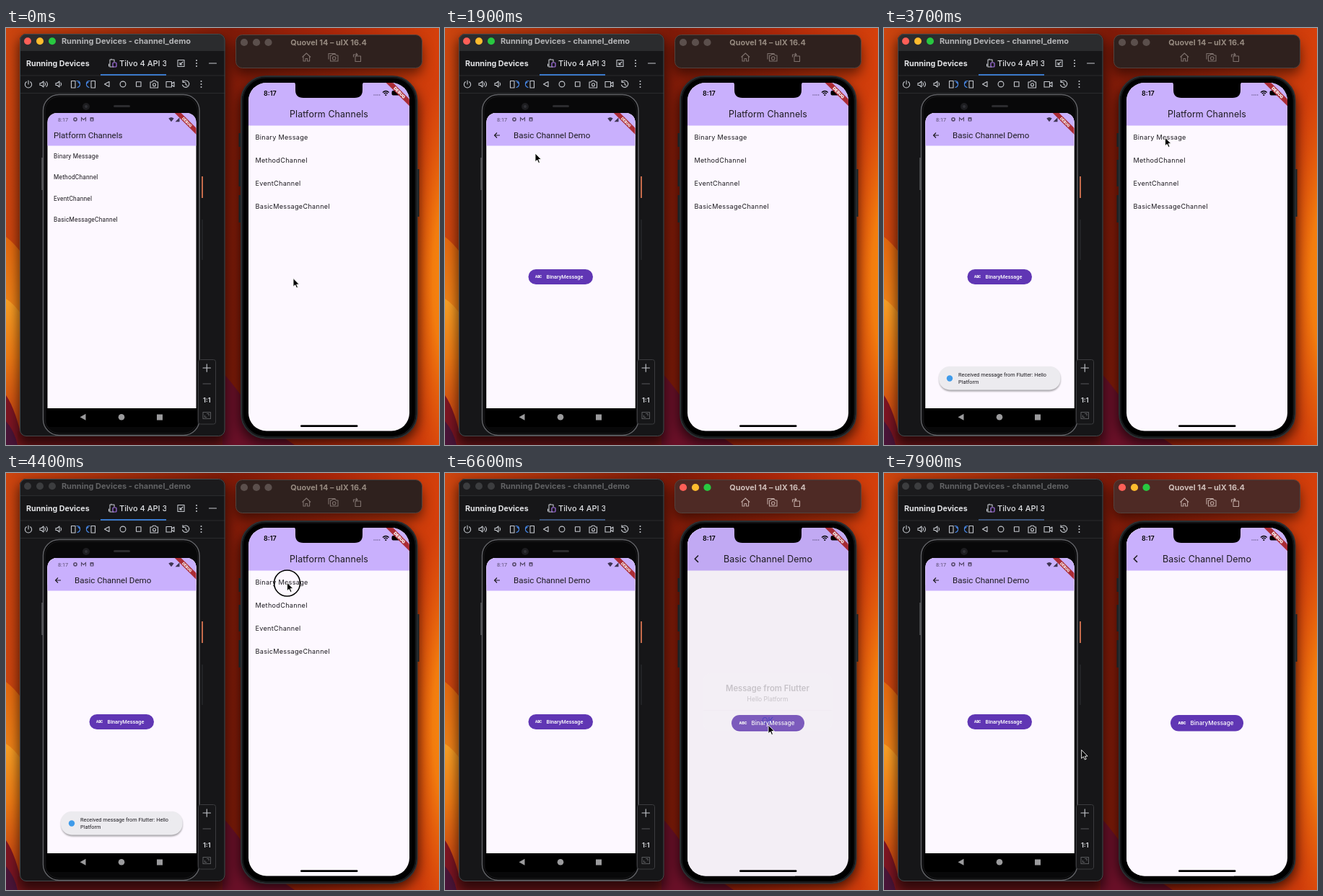
Recreate the animation shown at these times as an HTML page. Size 600 by 579 pixels, loop 8 s.

```html
<!DOCTYPE html>
<html lang="en">
<head>
<meta charset="utf-8">
<title>Platform Channels</title>
<style>
  html, body { margin: 0; width: 100%; height: 100%; overflow: hidden; background: #6e1607; }
  svg { display: block; width: 600px; height: 579px; font-family: Inter, sans-serif; }
  .android { font-family: Roboto, sans-serif; }
  .line { fill: none; stroke: #c5c8ce; stroke-width: 1.1; stroke-linecap: round; stroke-linejoin: round; }
  .blue { stroke: #4a8df0; }
  .mid { text-anchor: middle; }
  .bold { font-weight: 700; }
  .ink { fill: #1d1b20; }
  .white { fill: #fff; }
</style>
</head>
<body>
<svg viewBox="0 0 600 579" xmlns="http://www.w3.org/2000/svg">
  <defs>
    <linearGradient id="wall">
      <stop offset="0" stop-color="#cc450f"/><stop offset=".2" stop-color="#ad330c"/>
      <stop offset=".52" stop-color="#7e1a08"/><stop offset=".75" stop-color="#a8260a"/>
      <stop offset="1" stop-color="#d5400b"/>
    </linearGradient>
    <radialGradient id="glow" gradientUnits="userSpaceOnUse" cx="0" cy="0" r="1" gradientTransform="translate(625 350) scale(75 300)">
      <stop offset="0" stop-color="#ff9612"/><stop offset=".45" stop-color="#f27c0e"/>
      <stop offset="1" stop-color="#e2570c" stop-opacity="0"/>
    </radialGradient>
    <linearGradient id="swoosh" x2="0" y2="1">
      <stop offset="0" stop-color="#e4680f"/><stop offset=".35" stop-color="#ee8318"/>
      <stop offset="1" stop-color="#c23a0e"/>
    </linearGradient>
    <linearGradient id="band" x2="0" y2="1">
      <stop offset="0" stop-color="#f9a126"/><stop offset=".4" stop-color="#ee7a14"/>
      <stop offset="1" stop-color="#b8300f"/>
    </linearGradient>
    <filter id="soft" x="-20%" y="-30%" width="140%" height="160%"><feGaussianBlur stdDeviation="8"/></filter>
    <filter id="faint" x="-10%" y="-30%" width="120%" height="160%"><feGaussianBlur stdDeviation="1.2"/></filter>
    <clipPath id="aClip"><path d="M57.500 528V131a13 13 0 0 1 13-13h180a13 13 0 0 1 13 13v397z"/></clipPath>
    <clipPath id="iClip"><rect x="336" y="76" width="223" height="483.500" rx="25"/></clipPath>
    <clipPath id="tabClip"><rect x="130" y="32" width="92" height="34"/></clipPath>
  </defs>

  <!-- wallpaper -->
  <rect width="600" height="579" fill="url(#wall)"/>
  <rect x="540" width="60" height="579" fill="url(#glow)"/>
  <path d="M0 290Q12 299 24 316V579H0z" fill="url(#swoosh)"/>
  <path d="M0 376Q12 383 24 402V579H0z" fill="url(#band)"/>
  <path d="M0 510Q14 530 24 579H0z" fill="#7c1522"/>
  <path d="M0 546Q12 560 16 579H0z" fill="#4a1538"/>
  <path d="M16 560H330V579H16z" fill="#74161a"/>
  <path d="M300 478Q320 500 350 545L400 579H300z" fill="#6a1028"/>
  <g filter="url(#soft)">
    <rect x="17" y="14" width="288.500" height="566" rx="12" opacity=".6"/>
    <rect x="318" y="20" width="259" height="44" rx="12" opacity=".5"/>
    <rect x="324" y="76" width="247.500" height="500" rx="34" opacity=".65"/>
  </g>

  <!-- left window -->
  <rect x="19" y="8" width="284.500" height="559" rx="9" fill="#161618"/>
  <path id="aBar" d="M19 31V17a9 9 0 0 1 9-9h266.500a9 9 0 0 1 9 9v14z"/>
  <path d="M19 31.500h284.500M19 66h284.500M19 90.500h284.500" stroke="#2a2b2d"/>
  <rect x="19.500" y="8.500" width="283.500" height="558" rx="8.500" fill="none" stroke="#47484a"/>
  <g id="aLights"></g>
  <text id="aTitle" class="mid bold" x="166.500" y="22" font-size="11">Running Devices - channel_demo</text>
  <text class="bold" x="28" y="52.500" font-size="10.700" fill="#e4e5e8">Running Devices</text>
  <g clip-path="url(#tabClip)">
    <path class="line" d="M149 54h-5v-10h6v3M146 44v-1M142.500 50v3"/>
    <rect x="148" y="48" width="5" height="6" rx="1" fill="none" stroke="#a571e6" stroke-width="1.200"/>
    <text x="157" y="52.500" font-size="11" font-weight="500" fill="#dfe1e5">Tilvo 4 API 3</text>
  </g>
  <rect id="underline" x="131" y="64" width="91" height="2"/>
  <g id="tabTools">
    <path class="line" d="M238 44.500h9v9h-9zM245 47l-4 4M241 48v3h3M281.500 49h10"/>
    <g id="tabDots" fill="#c5c8ce"></g>
  </g>
  <g id="barDots" fill="#c5c8ce"></g>
  <!-- device toolbar -->
  <path class="line" d="M31 73v5M28.300 74.700a4.600 4.600 0 1 0 5.400 0"/>
  <path class="line" d="M47 76.500h2l3-2.500v8l-3-2.500h-2zM54 76q1.500 2 0 4M56 74.500q3 3.500 0 7M69 76.500h2l3-2.500v8l-3-2.500h-2zM76 76q1.500 2 0 4"/>
  <path class="line" d="M90.500 73.500h5.500v9.500h-5.500zM118 73.500h5.500v9.500h-5.500z"/>
  <path class="line blue" d="M99 82.500q4-1 3.500-6M98 73.500q4 0 4.500 3M100 75.500l2.500 1.500M115 82.500q-4-1-3.500-6M116 73.500q-4 0-4.500 3M114 75.500l-2.500 1.500"/>
  <path class="line" d="M143 74.500v7l-6.500-3.500zM180.500 74.800h6.500v6.500h-6.500zM200 75h2.500l1.200-1.800h3.600l1.200 1.800h2v8h-10.500zM222 74.500h7.500v7.500h-7.500zM230 77l3-2v6.500l-3-2M245.500 74.500a4.700 4.700 0 1 1-1 4.500M245 72.500v3h3M249 76v2.500l2 1"/>
  <circle class="line" cx="162" cy="78" r="3.900"/><circle class="line" cx="205.500" cy="78.800" r="2"/>

  <!-- left phone -->
  <rect x="51.500" y="92.500" width="216.500" height="473" rx="22" fill="#060607" stroke="#5f6064" stroke-width="1.500"/>
  <rect x="54" y="95" width="211.500" height="468" rx="20" fill="#080809" stroke="#202022" stroke-width=".8"/>
  <path d="M50 180v45" stroke="#77787c"/>
  <path d="M272 206v30" stroke="#c56b4b" stroke-width="2"/><path d="M272 266v56" stroke="#27282b" stroke-width="1.500"/>
  <circle cx="111" cy="109" r="5" fill="#1d1d20"/><circle cx="111" cy="109" r="2" fill="#303136"/>
  <rect x="149" y="107" width="23" height="3" rx="1.500" fill="#2b2b2e"/>
  <path d="M56 528h209v20q0 6-6 6H62q-6 0-6-6z" fill="#000"/>
  <g fill="#9b9b9d"><path d="M110.500 535.800v9l-8-4.500z"/><circle cx="160" cy="540.300" r="4.300"/><rect x="209" y="536.500" width="8" height="8"/></g>
  <g class="android" clip-path="url(#aClip)">
    <g id="aHome">
      <path d="M57 118h207v410H57z" fill="#fdf8ff"/><path d="M57 118h207v45.500H57z" fill="#c9b0fd"/>
      <rect id="aTile" x="57" y="163.500" width="207" height="29.500"/>
      <text class="ink" x="66" y="152.500" font-size="11.550">Platform Channels</text>
      <g id="aList" class="ink" font-size="8.400" letter-spacing=".2"></g>
    </g>
    <g id="aDemo">
      <path d="M57 118h207v410H57z" fill="#fdf8ff"/><path d="M57 118h207v45.500H57z" fill="#c9b0fd"/>
      <path d="M76 149h-7.500M72 145.500l-3.500 3.500 3.500 3.500" fill="none" stroke="#1d1b20" stroke-width="1.100"/>
      <text class="ink" x="95" y="152.500" font-size="11.550">Basic Channel Demo</text>
      <rect x="115.500" y="335" width="89.500" height="21" rx="10.500" fill="#6036b4"/>
      <rect id="aPress" x="115.500" y="335" width="89.500" height="21" rx="10.500" class="white"/>
      <text class="white" x="125" y="347.300" font-size="4.600" font-weight="900">ABC</text>
      <text class="white" x="140.500" y="348.300" font-size="7.350" font-weight="500">BinaryMessage</text>
    </g>
    <text x="72" y="129.500" font-size="7.400" fill="#584c6e">8:17</text>
    <g fill="none" stroke="#55496b" stroke-width="1.500">
      <circle cx="96" cy="126.800" r="2.100"/><path d="M104.500 129.500v-5l3 3 3-3v5" stroke-width="1.100"/>
    </g>
    <rect x="116.500" y="124" width="5" height="5.500" rx=".8" fill="#55496b"/>
    <path d="M119 125l-1.500 3.500h3z" fill="#c9b0fd"/>
    <path d="M229 130.200l-3.700-4.700q3.700-3 7.400 0zM234.500 130.200h6v-6z" fill="#3f3553"/>
    <g id="aBanner" transform="translate(263.500 118) rotate(45) scale(.525)"></g>
    <g id="toast">
      <g id="toastBox">
        <rect x="76.500" y="471.500" width="168" height="33" rx="15" fill="#000" opacity=".35" filter="url(#faint)"/>
        <rect x="76" y="470" width="168.500" height="32.500" rx="15" fill="#ecebef"/>
      </g>
      <g id="toastText">
        <circle cx="91" cy="486.500" r="4.200" fill="#3f9bea"/>
        <text class="ink" font-size="7.350"><tspan x="103" y="483.600">Received message from Flutter: Hello</tspan><tspan x="103" y="494">Platform</tspan></text>
      </g>
    </g>
  </g>
  <rect x="266.500" y="460.500" width="24" height="89.500" rx="3" fill="#161618" stroke="#3b3c3f"/>
  <path class="line" d="M273 472h10.500M278.250 466.800v10.500"/>
  <path class="line" d="M273 494h10.500M273 533.500h10.500v9h-10.500zM275.500 538v2.500h2.500M281 538v-2.500h-2.500" style="stroke:#58595c"/>
  <text class="mid bold" x="278.300" y="519.500" font-size="9" fill="#cfd1d5">1:1</text>

  <!-- right title bar -->
  <rect id="iBar" x="318.500" y="9.500" width="258" height="46" rx="9" stroke="#54423d"/>
  <g id="iLights"></g>
  <text id="iTitle" class="mid bold" x="447" y="23.700" font-size="10.900">Quovel 14 – ulX 16.4</text>
  <path id="iIcons" fill="none" stroke-width="1.100" stroke-linejoin="round" d="M410.500 40.500l5.800-5.500 5.800 5.500M412 39.500v6.500h3v-3.500h2.600v3.500h3v-6.500M449.500 38h2l1-1.500h4l1 1.500h2.500v8h-10.500zM447 43.500v-8h9.500M452.500 42a2.200 2.200 0 1 1 4.400 0 2.200 2.200 0 1 1-4.400 0M484 39h7.500v7.500h-7.500zM481.500 40.500v-3.500h5M485 35l2 2-2 2"/>

  <!-- right phone -->
  <path d="M324 146v19M324 183v37M324 232v38M571 196v66" stroke="#1b2326" stroke-width="3"/>
  <rect x="326" y="67" width="243.500" height="502.500" rx="34" fill="#000" stroke="#2a2f32" stroke-width="2"/>
  <rect x="328" y="69" width="239.500" height="498.500" rx="32" fill="none" stroke="#17191b" stroke-width="1.500"/>
  <g clip-path="url(#iClip)">
    <g id="iHome">
      <path d="M336 76h223v484H336z" fill="#fdf8ff"/><path d="M336 76h223v59.500H336z" fill="#c9b0fd"/>
      <rect id="iTile" x="336" y="135.500" width="223" height="32"/>
      <text class="ink mid" x="447.500" y="123.700" font-size="12.400" letter-spacing=".1">Platform Channels</text>
      <g id="iList" class="ink" font-size="9.100" letter-spacing=".3"></g>
    </g>
    <g id="iDemo">
      <path d="M331 76h5v484h-5z" fill="#000" opacity=".08"/>
      <path d="M336 76h223v484H336z" fill="#fdf8ff"/><path d="M336 76h223v59.500H336z" fill="#c9b0fd"/>
      <path d="M351 114.500l-4.700 4.700 4.700 4.700" fill="none" stroke="#1d1b20" stroke-width="1.500"/>
      <text class="ink mid" x="447.500" y="123.700" font-size="12.400" letter-spacing=".1">Basic Channel Demo</text>
      <rect x="397" y="336" width="101" height="22.500" rx="11.250" fill="#6036b4"/>
      <text class="white" x="407.500" y="349.200" font-size="5" font-weight="900">ABC</text>
      <text class="white" x="424.500" y="350.200" font-size="8" font-weight="500" letter-spacing=".05">BinaryMessage</text>
    </g>
    <text x="357" y="94" font-size="9" font-weight="600">8:17</text>
    <path d="M509.500 93h9" stroke="#75669a" stroke-width="1.300" stroke-dasharray="1.300 1.200"/>
    <path d="M522 89.500q4.300-4 8.600 0M523.700 91.300q2.600-2.400 5.200 0" fill="none" stroke="#000" stroke-width="1.300"/><circle cx="526.300" cy="93" r="1.100"/>
    <rect x="534.500" y="87" width="12" height="6.600" rx="2"/>
    <g id="iBanner" transform="translate(559 76) rotate(45) scale(.572)"></g>
    <rect x="408" y="551.300" width="79.500" height="2.800" rx="1.400"/>
    <rect id="dim" x="336" y="76" width="223" height="484"/>
    <g id="alert">
      <rect x="370" y="284" width="154" height="68" rx="8" fill="#f7f5f8"/>
      <path d="M370 328h154" stroke="#d8d6da" stroke-width=".5"/>
      <text class="mid" x="447" y="305.500" font-size="9.700" font-weight="600" fill="#222">Message from Flutter</text>
      <text class="mid" x="447" y="317.500" font-size="7.400" fill="#222">Hello Platform</text>
      <text class="mid" x="447" y="343.500" font-size="9.700" fill="#0a7aff">OK</text>
    </g>
  </g>
  <path d="M397 75q4 0 4 4v7q0 11 11 11h71q11 0 11-11v-7q0-4 4-4z"/>

  <circle id="ring" r="18" fill="none" stroke="#000" stroke-width="1.600"/>
  <path id="cursor" d="M0 0V11.800L2.700 9.300 4.600 13.500 6.500 12.700 4.700 8.600H8.400z" stroke="#fff" stroke-width=".9"/>
</svg>
<script>
const $ = id => document.getElementById(id);
const set = (id, attrs) => { for (const k in attrs) $(id).setAttribute(k, attrs[k]); };
const ramp = (t, a, b) => Math.min(1, Math.max(0, (t - a) / (b - a)));
const within = (t, a, b) => t >= a && t < b;
const easeOut = p => 1 - (1 - p) ** 3;
const smooth = p => p * p * (3 - 2 * p);
const zoom = (x, y, s) => `translate(${x} ${y}) scale(${s}) translate(${-x} ${-y})`;

const channels = ['Binary Message', 'MethodChannel', 'EventChannel', 'BasicMessageChannel'];
const list = (x, y, step) => channels.map((c, i) => `<text x="${x}" y="${y + i * step}">${c}</text>`).join('');
$('aList').innerHTML = list(66, 180.8, 29.4);
$('iList').innerHTML = list(345.5, 154.8, 32);

const circle = (x, y, r) => `<circle cx="${x}" cy="${y}" r="${r}"/>`;
const row = (xs, y, r) => xs.map(x => circle(x, y, r)).join('');
const menu = (x, y) => [-4, 0, 4].map(d => circle(x, y + d, 1)).join('');
$('aLights').innerHTML = row([30, 47, 64], 18.3, 5);
$('iLights').innerHTML = row([330, 347, 363.5], 20, 5.1);
$('tabDots').innerHTML = menu(264, 49);
$('barDots').innerHTML = menu(270.5, 78);

const banner = '<rect x="-44" y="28" width="88" height="12" fill="#ab2c35"/>' +
  '<text class="mid white" y="37.600" font-size="10.200" font-weight="900">DEBUG</text>';
$('aBanner').innerHTML = $('iBanner').innerHTML = banner;

const lightColors = ['#fe5f57', '#febc2e', '#28c840'];
function lights(id, on, off) {
  [...$(id).children].forEach((c, i) => c.setAttribute('fill', on ? lightColors[i] : off));
}

// time, x, y of the pointer tip
const path = [
  [300, 398, 347.5], [1000, 125, 174], [1950, 125, 174], [2400, 160, 346], [2680, 160, 346],
  [3000, 336.7, 224.5], [3500, 389.5, 152], [4600, 389.5, 152], [5350, 440, 319], [5900, 448, 350],
  [7250, 448, 350], [7800, 273.7, 384.5]
];
function pointer(t) {
  const i = path.findIndex(p => p[0] > t);
  if (i === 0) return path[0].slice(1);
  if (i < 0) return path[path.length - 1].slice(1);
  const [a, b] = [path[i - 1], path[i]], p = smooth(ramp(t, a[0], b[0]));
  return [a[1] + (b[1] - a[1]) * p, a[2] + (b[2] - a[2]) * p];
}
const clicks = [1100, 2450, 4300, 6300, 7050];

function draw(t) {
  const [x, y] = pointer(t);
  set('cursor', { transform: `translate(${x} ${y})` });
  set('ring', { cx: x, cy: y + 1, opacity: clicks.some(c => within(t, c, c + 190)) ? 1 : 0 });

  // window focus
  const aOn = t < 4400, iOn = t >= 4500;
  lights('aLights', aOn, '#3c3d3f');
  lights('iLights', iOn, '#5b4f4c');
  set('aBar', { fill: aOn ? '#2b2c2e' : '#1b1b1d' });
  set('aTitle', { fill: aOn ? '#b4b5b7' : '#616264' });
  set('underline', { fill: iOn ? '#3b5378' : '#3a78c9' });
  set('tabTools', { opacity: iOn ? 0 : 1 });
  set('iBar', { fill: iOn ? '#4e2a25' : '#2f211e' });
  set('iTitle', { fill: iOn ? '#cdbdb8' : '#95897f' });
  set('iIcons', { stroke: iOn ? '#bda6a0' : '#7d706c' });

  // left phone
  const a = easeOut(ramp(t, 1300, 1600));
  set('aHome', { transform: zoom(160, 323, 1 + .05 * a) });
  set('aDemo', { opacity: a, transform: zoom(160, 323, .88 + .12 * a) });
  set('aTile', { opacity: .08 * ramp(t, 1100, 1250) });
  set('aPress', { opacity: .1 * ramp(t, 2350, 2450) * (1 - ramp(t, 3000, 3200)) });
  const p = ramp(t, 2910, 3210) * (1 - ramp(t, 5120, 5403));
  set('toast', { transform: zoom(160, 486.5, 1 - .08 * (1 - p) ** 1.6) });
  set('toastBox', { opacity: Math.min(1, p * 3) });
  set('toastText', { opacity: p * p });

  // right phone
  const s = easeOut(ramp(t, 4500, 5000));
  set('iHome', { transform: `translate(${-74 * s} 0)` });
  set('iDemo', { transform: `translate(${228 * (1 - s)} 0)` });
  set('iTile', { opacity: .08 * ramp(t, 4400, 4500) });
  const shown = ramp(t, 6550, 6800), q = shown * (1 - ramp(t, 7200, 7450));
  set('dim', { opacity: .2 * q });
  set('alert', { opacity: q, transform: zoom(447, 318, 1.2 - .2 * shown) });
}

function tick(now) {
  draw(now % 8000);
  requestAnimationFrame(tick);
}
draw(0);
requestAnimationFrame(tick);
</script>
</body>
</html>
```
